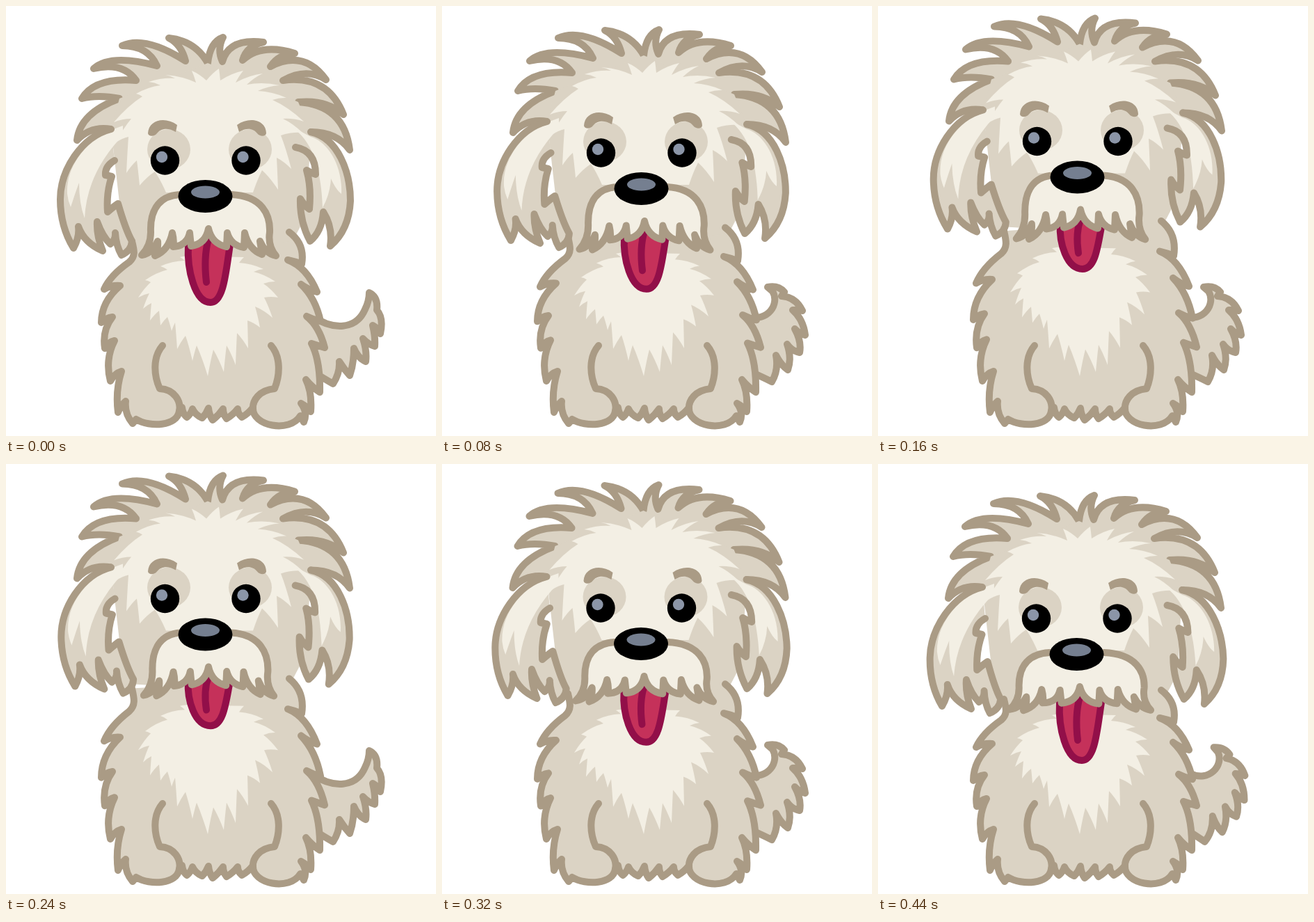
An HTML page that plays this animation: 618 by 618 pixels, repeating every 0.48 s.

```html
<!DOCTYPE html>
<html lang="en">
<head>
<meta charset="utf-8">
<title>Happy puppy</title>
<style>
  html, body { margin: 0; width: 100%; height: 100%; overflow: hidden; background: #fff; }
  svg { display: block; width: 100vw; height: 100vh; }
  .coat { fill: #dbd3c4; }
  .light { fill: #f3efe4; }
  .edge { stroke: #aa9b85; stroke-width: 10; stroke-linecap: round; stroke-linejoin: round; }
  .line { fill: none; }
  .tongue { stroke: #920f49; stroke-width: 10; stroke-linecap: round; stroke-linejoin: round; }
</style>
</head>
<body>
<svg viewBox="0 0 618 618">
  <path id="tail" class="coat edge"/>
  <path id="body" class="coat"/>
  <g class="head">
    <path class="coat edge" d="M151,177 Q122,172 102,193 Q106,154 163,133 Q132,127 109,133 Q128,102 187,107 Q168,80 126,90 Q150,68 217,86
      Q204,57 167,57 Q200,42 258,79 Q252,55 234,46 Q272,50 290,82 Q293,52 312,45 Q303,62 311,80 Q320,46 370,52 Q346,57 340,78
      Q366,53 415,68 Q392,69 380,87 Q428,62 460,106 Q432,88 398,107 Q462,98 485,156 Q460,134 420,138
      Q486,142 494,207 Q476,181 438,181"/>
    <path class="coat" d="M151,177 L165,300 L184,345 L300,352 L412,338 L432,300 L438,181 L420,138 L290,82 L163,133Z"/>
    <path id="face" class="light"/>
  </g>
  <path id="coatLine" class="edge line"/>
  <path id="legs" class="edge line" d="M225,488 C211,504 212,530 221,550 C242,551 252,568 249,582
    M381,488 C395,504 394,530 386,550 C365,552 353,566 355,582"/>
  <path id="chest" class="light"/>
  <g class="head">
    <path id="earL" class="coat"/><path id="earR" class="coat"/>
    <path id="shineL" class="light"/><path id="shineR" class="light"/>
    <path id="rimL" class="edge line"/><path id="rimR" class="edge line"/>
    <ellipse class="coat" cx="234" cy="206" rx="31" ry="29"/>
    <ellipse class="coat" cx="351" cy="206" rx="31" ry="29"/>
    <path fill="#aa9b85" d="M204,183 C205,164 228,158 246,171 L244,181 C233,174 222,176 217,183 C213,188 205,188 204,183Z
      M374,183 C374,164 350,158 332,171 L335,181 C346,174 356,176 361,183 C365,188 373,188 374,183Z"/>
    <g id="eye">
      <circle cx="228.5" cy="222" r="20.7"/>
      <circle cx="224" cy="217" r="8.2" fill="#8b95a7"/>
    </g>
    <use href="#eye" x="116.5"/>
    <path id="tongue" class="tongue" fill="#c5315a"/>
    <path id="crease" class="tongue line"/>
    <path id="muzzle" class="light edge"/>
    <ellipse cx="286.5" cy="273.5" rx="39" ry="23.5"/>
    <ellipse cx="286.5" cy="267.5" rx="20.5" ry="9" fill="#757f90"/>
  </g>
</svg>
<script>
const $ = id => document.getElementById(id);
const heads = document.querySelectorAll('.head');

// Per-step pose: head lift and outward swing of ears and muzzle.
const STEP = 40;
const LIFT = [0, -4, -11, -20, -27.5, -30, -28.5, -23, -15, -7.5, -2.5, 0];
const SWING = [0, 1, 2, 3, 3, 3, 2.3, 0, -2, -4, -4.3, -4];
const CURL = [0, 8, 0, -9, 0, 8];

const TAIL_OUT = `M440,446 C470,466 503,466 516,436 Q522,424 522,412 Q535,418 533,437 Q543,448 538,471
  Q533,462 527,459 Q531,476 530,489 Q520,486 513,478 Q519,496 517,511 Q506,506 500,492 Q500,514 494,531
  Q486,522 479,511 Q480,528 470,543 Q458,536 440,525`;
const TAIL_CURL = `M440,446 C468,455 486,428 475,410 L468,404 Q483,401 492,411 L488,417 Q508,418 518,438
  Q511,436 504,437 Q519,450 522,473 Q515,472 507,464 Q517,482 514,498 Q503,496 496,486 Q503,506 497,523
  Q487,516 480,502 Q484,524 474,540 Q462,534 440,524`;

const BODY = `M181,338 C184,350 187,360 177,368 Q150,387 141,407 Q152,401 164,402 Q137,425 137,455 Q144,448 153,447
  Q138,466 142,492 Q147,483 156,481 Q142,508 150,539 Q156,528 166,525 Q157,553 161,584 Q165,574 172,568
  Q170,586 182,600 L187,594 C207,606 246,604 249,582 L253,577 Q254,586 260,591 Q266,586 268,579
  Q272,588 282,592 Q288,586 291,578 Q292,588 297,595 Q306,588 312,579 Q312,587 317,593 Q327,587 333,579
  Q333,586 339,591 Q348,586 355,577 C353,604 408,614 423,589 L428,598 Q434,584 424,571 Q433,576 438,583
  Q440,555 431,537 Q440,548 451,555 Q452,510 439,485 Q448,488 458,491 Q450,460 432,446 Q442,451 452,453
  Q445,420 424,400 Q435,408 447,411 Q432,375 405,365 Q415,367 425,371 Q430,342 407,325`;

const CHEST = `290,360 250,361 257,366 222,374 232,379 200,394 208,397 190,419 206,413 197,435 209,427
  207,452 220,438 222,459 232,447 238,467 243,455 246,493 258,474 268,510 274,488 290,532 298,494 313,526
  317,488 330,516 332,470 348,492 347,452 365,462 358,432 383,448 371,419 391,419 370,399 387,396 356,382
  370,378 335,369 342,361`;
const FACE = `230,268 214,238 192,258 188,222 173,240 176,188 158,196 180,162 155,167 196,130 187,126 222,114
  205,109 243,104 229,99 273,110 267,93 288,107 306,90 308,107 341,93 330,110 369,97 346,113 393,114
  362,122 403,132 383,135 428,166 398,162 426,182 395,186 410,234 389,218 391,264 368,236 355,268`;

const EAR_L = `M151,177 C108,188 78,236 78,278 C78,306 86,330 97,348 Q106,332 104,317 Q112,340 139,352
  Q130,330 131,310 Q139,332 150,342 Q158,336 157,326 Q158,344 166,358 Q180,352 181,338
  Q172,322 161,284 Q155,288 146,296 Q144,268 152,245 L143,243 Q142,230 156,222`;
const EAR_R = `M438,181 C478,190 495,240 495,280 Q493,322 466,345 Q470,318 456,296 Q454,324 437,338
  Q422,310 423,277 Q428,286 436,292 Q439,260 432,236 Q438,240 445,242 Q445,208 416,203`;
const SHINE_L = `M168,172 C118,188 86,228 88,270 Q89,280 93,289 Q99,270 105,254 Q105,284 113,305
  Q116,240 168,186Z`;
const SHINE_R = `M395,165 C432,182 452,214 455,290 Q466,270 467,248 Q474,264 482,270 C484,226 460,194 438,188Z`;

const TONGUE = `M262,343 C260,378 271,426 294,426 C313,426 316,382 322,343 L291,326Z`;
const CREASE = `M291,335 C285,356 286,380 288,397`;
const MUZZLE = `M250,271 C215,273 207,300 208,325 Q208,345 195,358 Q211,355 218,338 Q219,350 214,359
  Q234,351 239,326 Q242,338 240,346 Q260,345 264,326 L266,345 Q287,342 291,320 Q296,342 317,346 L318,326
  Q323,344 342,347 L343,326 Q349,350 368,357 L365,338 Q372,355 388,359 Q376,345 379,325
  C380,300 368,273 324,271`;

const warp = (d, fn) => d.replace(/(-?[\d.]+),(-?[\d.]+)/g,
  (_, x, y) => fn(+x, +y).map(v => v.toFixed(2)).join());

// Curved tufts: every side between two points bows upwards.
function fur(list) {
  const p = list.trim().split(/\s+/).map(s => s.split(',').map(Number));
  return p.map(([x, y], i) => {
    if (!i) return `M${x},${y}`;
    const [a, b] = p[i - 1];
    return `Q${(a + x) / 2},${(b + y) / 2 - Math.hypot(x - a, y - b) * .1} ${x},${y}`;
  }).join(' ') + 'Z';
}

const chest = fur(CHEST);
$('face').setAttribute('d', fur(FACE));

function set(d, ...ids) {
  ids.forEach(id => $(id).setAttribute('d', d));
}

function draw(ms) {
  const i = Math.floor(ms / STEP) % LIFT.length;
  const lift = LIFT[i], swing = SWING[i];
  const dx = Math.min(0, swing) / 4;
  heads.forEach(h => h.setAttribute('transform', `translate(${dx} ${lift})`));

  const stretch = (x, y) => [x, y + lift * Math.max(0, 500 - y) / 300];
  set(warp(BODY, stretch), 'body', 'coatLine');
  set(warp(chest, stretch), 'chest');

  const hang = side => (x, y) => [x + side * swing * Math.max(0, y - 180) / 170, y];
  set(warp(EAR_L, hang(1)), 'earL', 'rimL');
  set(warp(EAR_R, hang(-1)), 'earR', 'rimR');
  set(warp(SHINE_L, hang(1)), 'shineL');
  set(warp(SHINE_R, hang(-1)), 'shineR');

  const lick = (x, y) => [x, 330 + (y - 330) * (1 + lift * .0078)];
  set(warp(TONGUE, lick), 'tongue');
  set(warp(CREASE, lick), 'crease');

  // The sides of the muzzle flare; its middle stays under the nose.
  set(warp(MUZZLE, (x, y) => {
    const far = Math.min(1, Math.abs(x - 291) / 85);
    return [291 + (x - 291) * (1 - swing * .013), y + (y - 272) * swing * .015 * far];
  }), 'muzzle');

  const wag = i % CURL.length;
  set(wag ? TAIL_CURL : TAIL_OUT, 'tail');
  $('tail').setAttribute('transform', `rotate(${CURL[wag]} 452 510)`);
}

const start = performance.now();
function tick() {
  draw(performance.now() - start);
  requestAnimationFrame(tick);
}
tick();
</script>
</body>
</html>
```
